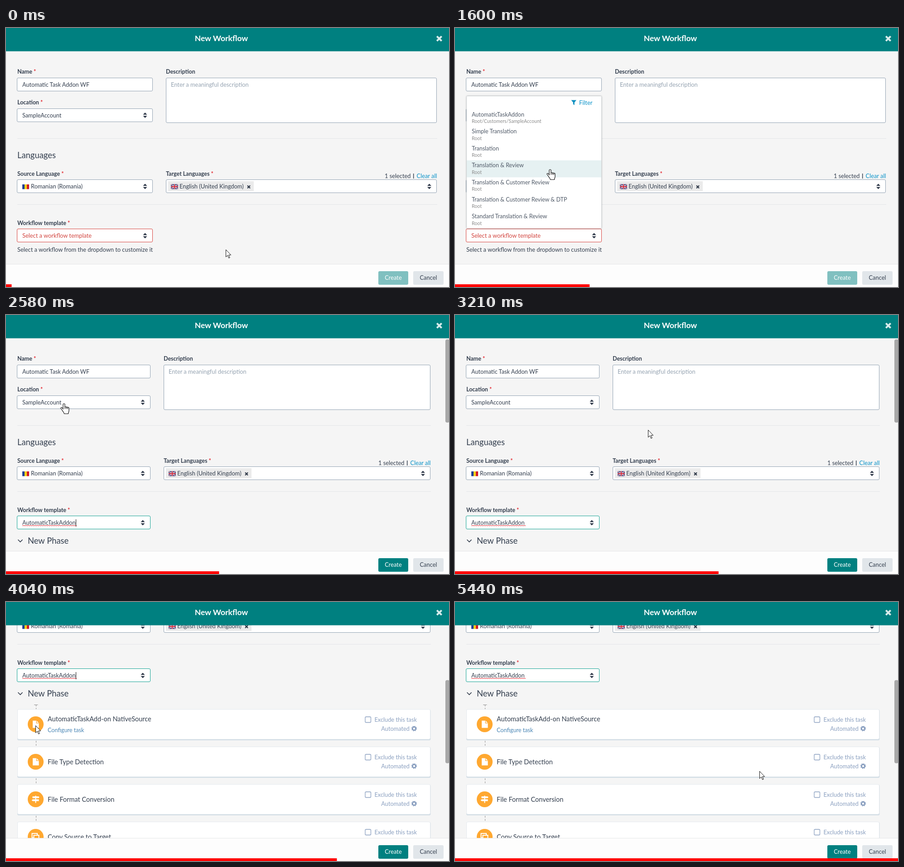
Write an HTML page that moves like this. It is 978 px wide and 573 px high and loops after 5.51 s.

```html
<!DOCTYPE html>
<html lang="en">
<head>
<meta charset="utf-8">
<title>New Workflow</title>
<style>
  html, body { margin: 0; width: 100%; height: 100%; overflow: hidden; background: #f5f5f5; }
  svg { display: block; }
  text { font: 12.85px Lato, Carlito, "Open Sans", sans-serif; fill: #343f4f; white-space: pre; }
  .label { font-size: 12.5px; font-weight: 700; }
  .field { font-size: 12.7px; }
  .head { font-size: 18.4px; }
  .title { font-size: 17.4px; font-weight: 700; fill: #fff; }
  .task { font-size: 14.5px; }
  .item { font-size: 12.5px; fill: #505a68; }
  .path { font-size: 10.6px; fill: #8b8b8b; }
  .hint { fill: #95a3b1; }
  .link { fill: #0b93c9; }
  .soft { font-size: 12.8px; fill: #8ba0c0; }
  .config { font-size: 12.7px; fill: #4a86b5; }
  .bad { fill: #d2453f; }
  .star { fill: #e3262e; }
  .end { text-anchor: end; }
  .mid { text-anchor: middle; }
</style>
</head>
<body>
<svg id="stage" width="978" height="573" viewBox="0 0 978 573"></svg>
<script>
const LOOP = 5510, FRAMES = 79;
const OPEN = 1180, PICK = 2580, CLICK = 1040, BLINK = 530;
const INK = '#2d3747', EDGE = '#93a3b3', TEAL = '#008080';
const PLACE = 'SampleAccount';

// drawing helpers
const text = (x, y, str, cls = '') =>
  `<text x="${x}" y="${y + 4.5}" class="${cls}">${str.replace(/&/g, '&amp;')}</text>`;
const rect = (x, y, w, h, fill, more = '') =>
  `<rect x="${x}" y="${y}" width="${w}" height="${h}" fill="${fill}" ${more}/>`;
const path = (d, more) => `<path d="${d}" ${more}/>`;
const line = (d, color, width = 1, more = '') =>
  path(d, `fill="none" stroke="${color}" stroke-width="${width}" ${more}`);
const group = (x, y, body, more = '') =>
  `<g transform="translate(${x} ${y})" ${more}>${body}</g>`;

const box = (x, y, r, h, color = EDGE) =>
  rect(x + .5, y + .5, r - x - 1, h - 1, '#fff', `rx="2.5" stroke="${color}"`);
const arrows = (x, y) => path(`M${x - 4.5} ${y - 1.3}l4.5-4.7 4.5 4.7zm0 2.6l4.5 4.7 4.5-4.7z`, `fill="${INK}"`);
const cross = (x, y, s, color, w) =>
  line(`M${x - s} ${y - s}l${2 * s} ${2 * s}m0 ${-2 * s}l${-2 * s} ${2 * s}`, color, w);
const label = (x, y, str, need = true) =>
  `<text x="${x}" y="${y + 4.5}" class="label">${str}${need ? ' <tspan class="star">*</tspan>' : ''}</text>`;

const flagRo = group(36, 346,
  rect(0, 0, 5, 10.5, '#1d3f94') + rect(5, 0, 5, 10.5, '#fbd116') + rect(10, 0, 5, 10.5, '#cf1a2b'));
const flagUk =
  rect(0, 0, 16, 11, '#253a7c') + line('M0 0L16 11M16 0L0 11', '#e8e8f0', 1.7) +
  line('M0 0L16 11M16 0L0 11', '#d0283a', .6) + line('M8 0V11M0 5.5H16', '#fff', 3.2) +
  line('M8 0V11M0 5.5H16', '#d0283a', 1.9);

// the upper form; narrow leaves room for the scrollbar
function form(narrow) {
  const left = narrow ? 319 : 324, col = narrow ? 348 : 353, right = narrow ? 938 : 952;
  const rule = y => rect(25, y, right - 25, 1, '#e3e5e8');
  return label(25, 96, 'Name') + box(24, 110, left, 30) +
    text(36, 125, 'Automatic Task Addon WF', 'field') +
    label(25, 164, 'Location') + box(24, 178, left, 30) +
    text(36, 193, PLACE, 'field') + arrows(left - 17, 193) +
    label(col, 96, 'Description', false) + box(col, 110, right - 1, 100) +
    text(col + 11, 125, 'Enter a meaningful description', 'hint') +
    rule(244) + text(25, 283.5, 'Languages', 'head') +
    label(25, 322, 'Source Language') + box(24, 335, left, 30) + flagRo +
    text(55, 350.5, 'Romanian (Romania)') + arrows(left - 17, 350.5) +
    label(col, 322, 'Target Languages') +
    text(right - 58.5, 327, '1 selected', 'end') + rect(right - 53, 322, 1.4, 11, INK) +
    text(right - .5, 327, 'Clear all', 'link end') +
    box(col, 335, right - 1, 30) + rect(col + 5, 339, 189, 22, '#ebebeb') +
    group(col + 11, 345.5, flagUk) + text(col + 30, 350, 'English (United Kingdom)') +
    cross(col + 183, 351.5, 3, INK, 2.2) + arrows(right - 17.5, 350.5) +
    rule(390) + label(25, 431, 'Workflow template') +
    box(24, 444, left, 30, narrow ? '#16a394' : '#d8453f') +
    text(36, 459.5, narrow ? 'AutomaticTaskAddon' : 'Select a workflow template', narrow ? 'field' : 'bad') +
    arrows(left - 17, 459.5) +
    (narrow ? '' : text(25, 490.5, 'Select a workflow from the dropdown to customize it'));
}

// icons centred on the origin
const doc = path('M-6.5-8H2l5 5V8h-13.5z', 'fill="#fff"') + line('M1.7-8v5.3H7', '#ffa830', 1.2);
const signs = path('M-1-8h2v1.5h5l2.5 2-2.5 2H1V0h6v4H1v4h-2V4h-5.5l-2.5-2 2.5-2H-1v-2.5h-6v-4h6z', 'fill="#fff"');
const copy = line('M-4-3.5h11v9H-4zM-4 2h-4v-9.5H3.5v4', '#fff', 2);
const gear = `<circle r="3.6" fill="none" stroke="#8ba0c0" stroke-width="2.8"/>
  <circle r="5.2" fill="none" stroke="#8ba0c0" stroke-width="1.8" stroke-dasharray="2.04"/>`;

const tasks = [
  ['AutomaticTaskAdd-on NativeSource', doc],
  ['File Type Detection', doc],
  ['File Format Conversion', signs],
  ['Copy Source to Target', copy]
];

function card([name, icon], i) {
  const first = i === 0;
  return group(0, 534 + 83 * i,
    rect(25, 1, 912.5, 68, '#d3dee6', 'rx="3"') +
    rect(25.5, .5, 911, 66, '#fff', 'rx="3" stroke="#e5eaee"') +
    group(65.5, 33.5, '<circle r="17.5" fill="#ffa830"/>' + icon) +
    text(92, first ? 22.5 : 34.5, name, 'task') +
    (first ? text(92, 46, 'Configure task', 'config') : '') +
    rect(793, 17, 12.5, 12.5, '#fff', 'rx="2" stroke="#8ba0c0" stroke-width="1.3"') +
    text(907, 23.5, 'Exclude this task', 'soft end') +
    text(891, 43, 'Automated', 'soft end') + group(901, 43, gear) +
    line('M66.5 70V83', '#909090', 1, 'stroke-dasharray="4 3"'));
}

let wave = 'M36 467';
for (let i = 0; i < 30; i++) wave += 'l2-2 2 2';

const phase = line('M26.5 497l5 5 5-5', INK, 1.6) + text(48, 501.5, 'New Phase', 'head') +
  line('M62 524.5h8.5M66.5 525v3m0 3v3', '#909090') + tasks.map(card).join('') +
  line(wave, '#e5202a', 1);

const templates = ['AutomaticTaskAddon', 'Simple Translation', 'Translation', 'Translation & Review',
  'Translation & Customer Review', 'Translation & Customer Review & DTP', 'Standard Translation & Review'];
const ROW = 37.6, TOP = 180;

const menu = rect(25.5, 150.5, 298, 293, '#fff', 'rx="2" stroke="#cfd3d6" filter="url(#shade)"') +
  rect(26, TOP, 297, ROW, '#e6f1f2', 'id="hover"') +
  path('M256.5 159.5h11.5l-4.3 5.3v5.7l-2.9-2v-3.7z', 'fill="#0b8fc0"') +
  text(274, 165, 'Filter', 'link') +
  templates.map((name, i) => text(37, 191 + ROW * i, name, 'item') +
    text(37, 205.5 + ROW * i, i ? 'Root' : 'Root/Customers/' + PLACE, 'path')).join('');

const hand = path('M-2 2a2 2 0 0 1 4 0v6a1.7 1.7 0 0 1 3.2 .3a1.6 1.6 0 0 1 3 .7a1.5 1.5 0 0 1 2.8 1v5.5' +
  'c0 3-1.6 4-1.6 7h-9c0-3-3-5-4.2-7.5l-3-4.2c-1-2 1.4-3 2.6-1.6l2.2 2.6z',
  'fill="#fff" stroke="#111" stroke-width="1.2"') +
  line('M2 8v4M5.2 8.3v3.7M8.2 9v3', '#111');
const arrow = path('M.5.5v16l3.7-3.5 2.6 6 2.4-1-2.6-5.8h5z', 'fill="#fff" stroke="#111"');

stage.innerHTML = `
  <defs>
    <clipPath id="view"><rect y="51" width="978" height="472"/></clipPath>
    <filter id="shade"><feDropShadow dx="0" dy="0" stdDeviation="1.5" flood-opacity=".25"/></filter>
  </defs>` +
  rect(0, 0, 978, 573, '#f5f5f5') +
  `<g clip-path="url(#view)">
    <g id="wide">${form(false)}</g>
    <g id="slim">${form(true)}${phase}</g>
    ${rect(970, 54, 9, 184, '#a8a8a8', 'id="thumb" rx="4"')}
    <g id="menu">${menu}</g>
    ${rect(0, 0, 1, 16, '#111', 'id="caret"')}
  </g>` +
  rect(0, 0, 978, 51.5, TEAL) + text(475.5, 24, 'New Workflow', 'title mid') +
  cross(956.5, 23.5, 5.2, '#d9ecec', 4) +
  rect(0, 522, 978, 51, '#fdfdfd') + rect(0, 522, 978, 1, '#e4e6e8') +
  rect(822, 538, 66, 30, TEAL, 'id="create" rx="3"') +
  `<text x="855" y="557" class="mid" style="fill:#fff">Create</text>` +
  rect(899, 538, 67, 30, '#e1e6ea', 'rx="3"') + text(932.5, 552.5, 'Cancel', 'mid') +
  rect(0, 567, 0, 6, '#f00', 'id="bar"') +
  `<g id="mouse"><circle id="ring" r="11.5" fill="#ffee33" opacity=".75"/>
    <g id="hand">${hand}</g><g id="arrow">${arrow}</g></g>`;

const el = id => document.getElementById(id);
const show = (id, on) => el(id).setAttribute('visibility', on ? 'visible' : 'hidden');
const set = (id, key, value) => el(id).setAttribute(key, value);

// time, x, y of the pointer
const route = [
  [0, 485, 490], [140, 505, 478], [350, 420, 437], [550, 328, 456], [690, 313, 464],
  [1180, 313, 464], [1740, 175, 262], [1950, 150, 227], [2230, 128, 196], [2580, 128, 196],
  [2900, 300, 225], [3210, 426, 254], [3490, 411, 352], [4040, 65, 273], [4250, 65, 273],
  [5100, 672, 374]
];
const scrolls = [[3220, 0], [3490, 275], [3630, 297]];

function at(keys, t, k) {
  const i = keys.findIndex(key => key[0] > t);
  if (i < 0) return keys[keys.length - 1][k];
  if (i === 0) return keys[0][k];
  const a = keys[i - 1], b = keys[i];
  return a[k] + (b[k] - a[k]) * (t - a[0]) / (b[0] - a[0]);
}

// steps of 70 ms, a few of them 10 ms shorter or longer
const startOf = i => 70 * i - (i > 4 ? 10 : 0) - (i > 54 ? 10 : 0) + (i === 29 ? 10 : 0);

function draw(time) {
  let step = FRAMES - 1;
  while (step && startOf(step) > time) step--;
  const t = startOf(step);
  const x = Math.round(at(route, t, 1)), y = Math.round(at(route, t, 2));
  const scroll = Math.round(at(scrolls, t, 1));
  const open = t >= OPEN && t < PICK, picked = t >= PICK;

  show('wide', !picked);
  show('slim', picked);
  show('thumb', picked);
  show('menu', open);
  set('slim', 'transform', `translate(0 ${-scroll})`);
  set('thumb', 'y', 54 + scroll * .4);
  set('create', 'fill', picked ? TEAL : '#80c0c0');

  const row = Math.floor((y - TOP) / ROW);
  set('hover', 'y', TOP + ROW * (row >= 0 && row < templates.length ? row : 0));

  const focus = picked ? PICK : CLICK;
  show('caret', t >= focus && Math.floor((t - focus) / BLINK) % 2 === 0);
  set('caret', 'x', picked ? 154 : 36);
  set('caret', 'y', 452 - scroll);

  const pointing = t >= 560 && t < 2650;
  show('hand', pointing);
  show('arrow', !pointing);
  show('ring', (t >= CLICK && t < OPEN) || (t >= PICK - 140 && t < PICK));
  set('mouse', 'transform', `translate(${x} ${y})`);
  set('bar', 'width', 978 * (step + 1) / FRAMES);
}

const began = performance.now();
function tick() {
  draw((performance.now() - began) % LOOP);
  requestAnimationFrame(tick);
}
tick();
</script>
</body>
</html>
```
